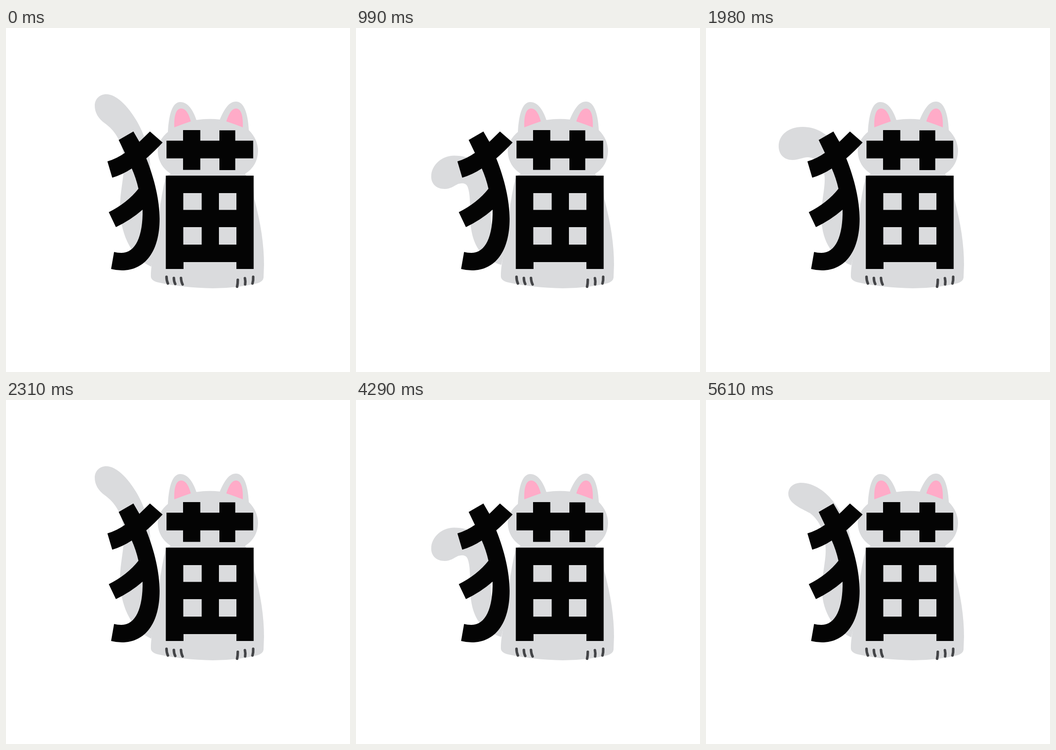
An HTML page for the animation above (5940 ms loop, 748 px wide and 748 px high).

```html
<!DOCTYPE html>
<html lang="ja">
<head>
<meta charset="utf-8">
<title>猫</title>
<style>
  html, body { margin: 0; width: 100%; height: 100%; overflow: hidden; background: #fff; }
  svg { display: block; width: 100%; height: 100%; }
  .fur { fill: #dadbdd; }
  .ink { fill: #040404; }
  .ear { fill: #ffabc8; }
  .claws { fill: none; stroke: #444548; stroke-width: 5.6; stroke-linecap: round; }

  /* The loop has 18 beats of 330 ms; each tail pose is shown on its own beats. */
  .tail path { opacity: 0; animation: 5940ms step-end infinite; }
  .tail .up { animation-name: up; }
  .tail .high { animation-name: high; }
  .tail .mid { animation-name: mid; }
  .tail .low { animation-name: low; }
  .tail .down { animation-name: down; }
  @keyframes up {
    0%, 38.88% { opacity: 1; }
    5.55%, 66.66%, 100% { opacity: 0; }
  }
  @keyframes high {
    5.55%, 94.44% { opacity: 1; }
    0%, 11.11%, 100% { opacity: 0; }
  }
  @keyframes mid {
    11.11%, 33.33%, 66.66%, 88.88% { opacity: 1; }
    0%, 16.66%, 38.88%, 72.22%, 94.44%, 100% { opacity: 0; }
  }
  @keyframes low {
    16.66%, 27.77%, 72.22%, 83.33% { opacity: 1; }
    0%, 22.22%, 33.33%, 77.77%, 88.88%, 100% { opacity: 0; }
  }
  @keyframes down {
    22.22%, 77.77% { opacity: 1; }
    0%, 27.77%, 83.33%, 100% { opacity: 0; }
  }
</style>
</head>
<body>
<svg viewBox="0 0 748 748">
  <g class="tail fur">
    <path class="up" d="M316 519C268 497 248 440 248 390C248 350 259 320 256 280C252 245 235 222 216 208C200 197 193 183 193 169C193 154 204 144 218 144C240 144 265 170 283 200C302 232 314 270 314 310C314 340 300 380 300 410C300 440 310 460 326 470Z"/>
    <path class="high" d="M316 516C270 497 252 450 252 410C252 380 262 345 260 320C257 285 247 262 226 246C205 235 179 224 179 204C179 189 191 180 207 180C235 180 262 200 280 225C300 252 315 285 315 315C315 340 301 380 301 410C301 440 310 460 326 470Z"/>
    <path class="mid" d="M316 516C268 497 251 455 251 410C251 375 259 350 258 325C257 300 243 282 222 281C210 281 202 287 188 287C170 287 158 275 158 257C158 232 180 215 210 215C240 215 265 230 285 258C300 280 311 310 311 335C311 360 298 385 298 410C298 440 308 460 326 470Z"/>
    <path class="low" d="M316 515C258 499 248 450 248 400C248 380 248 360 243 346C239 336 231 337 222 339C212 344 205 350 193 350C175 350 163.500 339 163.500 323C163.500 297 188 277.500 213 277.500C250 277.500 275 295 285 325C292 350 292 380 293 405C293 430 300 455 326 470Z"/>
    <path class="down" d="M316 517C266 499 250 460 247 420C246 398 241 384 231 384C218 384 209 405 184 405C165 405 153 393 153 376C153 346 183 320 218 318C252 317 276 332 285 360C292 380 291 398 293 415C295 440 304 460 326 470Z"/>
  </g>

  <path class="fur" d="M352 226C354 190 361 161 379 161C395 161 407 178 414 200Q440 196 465 199C474 178 484 160 500 160C517 160 526 184 528 222Q548 242 548 268Q547 300 520 317L538 345L540 372C554 425 561 470 561 515L560 543Q559 551 547 555Q502 566 450 566Q385 565 330 553Q315 549 315 540C315 500 332 460 334 400Q337 365 348 322L358 317Q331 299 330 268Q331 243 352 226Z"/>

  <path class="ear" d="M366 216C365 190 370 175 381 175C392 175 398 189 402 203Q384 209 366 216Z"/>
  <path class="ear" d="M515 216C516 190 511 175 500 175C490 175 484 189 479 203Q497 209 515 216Z"/>

  <path class="claws" d="M349 541Q349 549 352 555.500M365 543.500Q365 551 368 556.500M380.500 543.500Q381 552 384 557.500M504 547.500Q504 556 502.500 562.500M519.500 544Q521 551 520 557.500M537.500 541Q538 549 536 555.500"/>

  <g class="ink">
    <path d="M245 243.500L277 225L290 247.500L313 225L340.500 249Q323 268 305 283.500C323 328 334 375 334 415C334 485 303 527 252 527Q240 527 228.500 524L235 487Q242 489 251 489C282 489 298 452 297 395Q272 417 239 433L223.500 400.500Q264 380 288 349.500Q283 327 273.500 305.500Q253 319 231 325.500L220.500 290Q241 284 258.500 271.500Z"/>
    <path d="M349 245H385V222H422.500V245H464V222.500H498.500V245H537.500V283.500H498.500V309H464V283.500H422.500V308.500H385V283.500H349Z"/>
    <path fill-rule="evenodd" d="M347.500 321H538.500V524H501V509H386V524H347.500ZM385.500 359V395.500H425.500V359ZM463 359V395.500H501V359ZM385.500 433V471H425.500V433ZM463 433V471H501V433Z"/>
  </g>
</svg>
</body>
</html>
```
